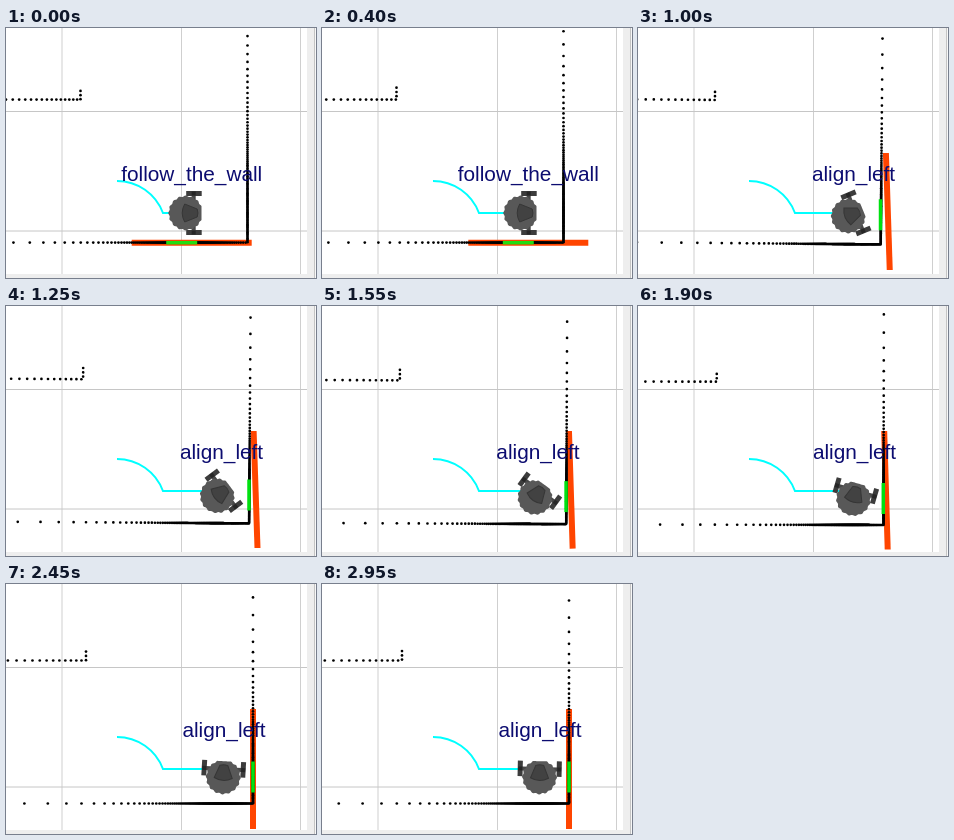
An HTML page with a canvas that plays this animation: 310x250 px, repeating every 3000 ms.

```html
<!DOCTYPE html>
<html lang="en">
<head>
<meta charset="utf-8">
<title>Wall following robot</title>
<style>
html, body { margin: 0; width: 100%; height: 100%; overflow: hidden; background: #fff; }
canvas { display: block; }
</style>
</head>
<body>
<canvas id="stage" width="310" height="250"></canvas>
<script>
const ctx = document.getElementById('stage').getContext('2d');
const LOOP = 3000, STEP = 50, TURN_AT = 600;
const RAD = Math.PI / 180;

// Rows of [time, ...values], interpolated linearly.
function track(rows, t) {
  if (t <= rows[0][0]) return rows[0].slice(1);
  for (let i = 1; i < rows.length; i++) {
    const a = rows[i - 1], b = rows[i];
    if (t <= b[0]) {
      const k = (t - a[0]) / (b[0] - a[0]);
      return a.slice(1).map((v, j) => v + (b[j + 1] - v) * k);
    }
  }
  return rows[rows.length - 1].slice(1);
}

// corner x, corner y, tilt in degrees
const ROOM = [
  [600, 241.5, 214.6, 0], [750, 242.3, 215.5, 0.6], [1250, 243.1, 217.4, 0.4],
  [1900, 245.5, 219, 0.1], [2350, 247, 219.5, 0]
];
// bar top x, bottom x, bottom y, green x, green top, label centre
const ALIGN = [
  [750, 248.2, 252, 242, 242, 169, 215.5], [1250, 247.6, 251.5, 242, 243, 173.5, 215.5],
  [1900, 246.2, 249.7, 243.5, 245.3, 177, 216.5], [2350, 247, 247, 245, 247, 177.5, 218]
];

// Turn at 1 rad/s, then ease into the final heading.
function heading(t) {
  const start = 609, rate = 0.0573, goal = 89.2, tau = 294;
  const slow = goal - rate * tau, slowAt = start + slow / rate;
  if (t < start) return 0;
  if (t < slowAt) return (t - start) * rate;
  return goal - (goal - slow) * Math.exp(-(t - slowAt) / tau);
}

function line(color, width, x1, y1, x2, y2) {
  ctx.strokeStyle = color;
  ctx.lineWidth = width;
  ctx.beginPath();
  ctx.moveTo(x1, y1);
  ctx.lineTo(x2, y2);
  ctx.stroke();
}

function box(color, x, y, w, h) {
  ctx.fillStyle = color;
  ctx.fillRect(x, y, w, h);
}

function grid() {
  box('#fff', 0, 0, 310, 250);
  for (const x of [56, 175.5, 294.5]) line('#cfcfcf', 1, x, 0, x, 246);
  for (const y of [83.5, 203]) line('#c6c6c6', 1, 0, y, 301, y);
}

function panel() {
  box('#eeeeee', 301, 0, 7, 250);
  box('#eeeeee', 0, 246, 308, 4);
  box('#c4c4c4', 308, 0, 1, 250);
  box('#f8f8f8', 309, 0, 1, 250);
}

// Nearest wall hit along one ray, in room coordinates.
function cast(x, y, dx, dy) {
  let best = Infinity;
  const hit = (d, ok) => { if (d > 0 && d < best && ok) best = d; };
  hit(-x / dx, true);
  hit(-y / dy, true);
  const flat = (-143 - y) / dy, side = (-167 - x) / dx;
  hit(flat, x + dx * flat < -167);
  const sy = y + dy * side;
  hit(side, sy < -143 && sy > -155);
  return best;
}

function scan(t, ox, oy, h) {
  const [cx, cy, tilt] = track(ROOM, t);
  const x = ox - cx, y = oy - cy;
  ctx.save();
  ctx.translate(cx, cy);
  ctx.rotate(tilt * RAD);
  ctx.fillStyle = '#000';
  for (let k = 0; k < 360; k++) {
    const a = (h + k + 0.75 + tilt) * RAD;
    const dx = Math.cos(a), dy = -Math.sin(a);
    const d = cast(x, y, dx, dy);
    if (d > 400) continue;
    ctx.beginPath();
    ctx.arc(x + dx * d, y + dy * d, 1.35, 0, 2 * Math.PI);
    ctx.fill();
  }
  ctx.restore();
}

function trail(x) {
  ctx.strokeStyle = '#00ffff';
  ctx.lineWidth = 2;
  ctx.beginPath();
  ctx.arc(111, 202, 49, -90 * RAD, -20.3 * RAD);
  ctx.lineTo(x - 6, 185);
  ctx.stroke();
}

function robot(x, y, h) {
  ctx.save();
  ctx.translate(x, y);
  ctx.rotate(-h * RAD);
  box('#484848', -2, -18, 4, 36);
  for (const s of [-1, 1]) {
    box('#3c3c3c', -7.5, s * 19.5 - 2.5, 15.5, 5);
    box('#262626', -2, s * 19.5 - 2, 4, 4);
  }
  ctx.fillStyle = '#585858';
  ctx.beginPath();
  for (let i = 0; i < 96; i++) {
    const a = i * 3.75 * RAD, r = 16.9 + 0.6 * Math.cos(16 * a);
    ctx.lineTo(Math.min(7.8, -8 + r * Math.cos(a)), r * Math.sin(a));
  }
  ctx.fill();
  // shield-shaped top plate, narrow end forward
  ctx.fillStyle = '#424242';
  ctx.strokeStyle = '#363636';
  ctx.lineWidth = 1;
  ctx.beginPath();
  ctx.moveTo(3.5, -4);
  ctx.quadraticCurveTo(5, 0, 3.5, 4);
  ctx.lineTo(-9, 9);
  ctx.quadraticCurveTo(-14, 0, -9, -9);
  ctx.closePath();
  ctx.fill();
  ctx.stroke();
  ctx.restore();
}

function label(text, x) {
  ctx.font = '20.8px "Liberation Sans", Arial, sans-serif';
  ctx.textAlign = 'center';
  ctx.fillStyle = '#0c0c70';
  ctx.fillText(text, x, 153);
}

function draw(t) {
  const h = heading(t), px = Math.min(217.7, 187.7 + 0.0475 * t), py = 185;
  const ox = px - 8 * Math.cos(h * RAD), oy = py + 8 * Math.sin(h * RAD);
  const following = t < TURN_AT;
  const mark = 185.7 + 0.0515 * t;
  const [top, foot, footY, gx, gy, tx] = track(ALIGN, t);

  grid();
  if (following) line('#ff4500', 6, mark - 60, 214.8, mark + 60, 214.8);
  else line('#ff4500', 6, top, 125, foot, footY);
  scan(t, ox, oy, h);
  if (following) line('#22dd11', 3.5, mark - 25.5, 214.7, mark + 5.5, 214.7);
  else line('#00e010', 3.5, gx, gy, gx, gy + 31);
  trail(px);
  robot(px, py, h);
  label(following ? 'follow_the_wall' : 'align_left', following ? mark : tx);
  panel();
}

const start = performance.now();
function tick() {
  const t = (performance.now() - start) % LOOP;
  draw(Math.floor(t / STEP) * STEP);
  requestAnimationFrame(tick);
}
tick();
</script>
</body>
</html>
```
